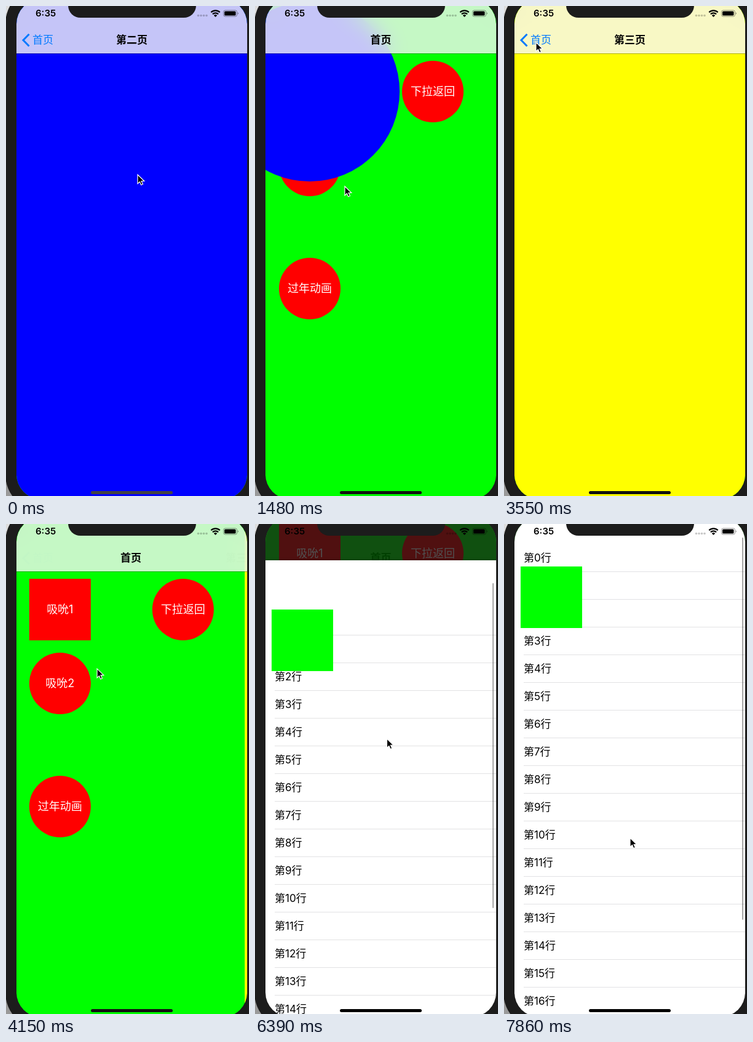
An HTML page that plays this animation: 395 by 796 pixels, repeating every 8 s.

```html
<!DOCTYPE html>
<html lang="zh">
<head>
<meta charset="utf-8">
<style>
html, body { margin: 0; width: 100%; height: 100%; overflow: hidden; }
body { position: relative; background: linear-gradient(#ddd, #999); font: 17px/44px Inter, "Noto Sans CJK SC", "Noto Sans CJK", sans-serif; color: #000; }
div, svg { position: absolute; }
.phone { left: -1px; top: -31px; width: 420px; height: 852px; border-radius: 60px; background: #1c1c1c; }
.screen { left: 17px; top: -11px; width: 375px; height: 812px; border-radius: 40px; overflow: hidden; }
.full { left: 0; top: 0; width: 375px; height: 812px; }
#home { background: #0f0; }
.btn { width: 100px; height: 100px; border-radius: 50%; background: #f00; color: #fff; font-size: 18px; line-height: 100px; text-align: center; white-space: nowrap; }
#nav { left: 0; top: 0; width: 375px; height: 89px; }
#bar { left: 0; top: 0; width: 375px; height: 88px; background: rgba(247,247,247,.8); backdrop-filter: blur(18px); }
#line { left: 0; top: 88px; width: 375px; height: 1px; background: rgba(0,0,0,.3); }
.title { left: 0; top: 44px; width: 375px; text-align: center; font-weight: 600; }
#back { left: 26px; top: 44px; width: 80px; color: #007aff; }
#back svg { left: -18px; top: 11px; }
#sheet { background: #fff; }
.row { left: 15px; width: 360px; height: 44px; border-bottom: 1px solid #e2e2e4; }
.box { left: 10px; top: 80px; width: 100px; height: 100px; background: #0f0; }
#thumb { border-radius: 2px; background: rgba(0,0,0,.35); }
.notch { left: 84px; top: 0; width: 208px; height: 30px; border-radius: 0 0 20px 20px; background: #1c1c1c; }
.clock { left: 31px; top: 1px; font-size: 15px; font-weight: 600; }
#pill { left: 121px; top: 799px; width: 133px; height: 5px; border-radius: 3px; }
#cursor { left: -1px; top: -1px; overflow: visible; }
</style>
</head>
<body>
<div class="phone"></div>
<div class="screen">
  <div id="home" class="full"></div>
  <div id="page" class="full"></div>
  <div id="veil" class="full"></div>
  <div id="nav">
    <div id="bar"></div><div id="line"></div>
    <div id="homeTitle" class="title">首页</div>
    <div id="pageTitle" class="title"></div>
    <div id="back"><svg width="16" height="24"><path d="M12.5 1.8 3 11.5l9.5 9.7" fill="none" stroke="#007aff" stroke-width="3"/></svg>首页</div>
  </div>
  <div id="sheet" class="full"><div id="rows"></div><div class="box"></div><div id="thumb"></div></div>
  <div class="notch"></div>
  <div class="clock">6:35</div>
  <svg width="375" height="40" style="left:0;top:0">
    <g fill="#000" fill-opacity=".22"><circle cx="295.5" cy="26.5" r="1.8"/><circle cx="300" cy="26.5" r="1.8"/><circle cx="304.500" cy="26.5" r="1.8"/><circle cx="309" cy="26.5" r="1.8"/></g>
    <g fill="none" stroke="#000" stroke-width="2.2"><path d="M316.300 21.300a10.200 10.200 0 0 1 14.400 0M318.900 24.200a6.500 6.500 0 0 1 9.200 0"/></g>
    <path d="M323.500 29l-2.700-2.800a3.900 3.900 0 0 1 5.400 0z"/>
    <rect x="336.500" y="18" width="22" height="10" rx="2.8" fill="none" stroke="#000" stroke-opacity=".4"/>
    <rect x="338" y="19.500" width="18.500" height="7" rx="1.500"/>
    <path d="M359.800 21.200v3.600q1.300-.5 1.300-1.800t-1.300-1.800z" fill-opacity=".4"/>
  </svg>
  <div id="pill"></div>
</div>
<svg id="cursor" width="16" height="22"><path d="M1 1v14.700l3.400-3.200 2.300 5.200 2.700-1.200-2.300-5h4.600z" stroke="#fff" stroke-width="1.200"/></svg>
<script>
const $ = id => document.getElementById(id);
const LOOP = 8000, STEP = 148.3, H = 812;

const add = (parent, cls, text, css) => {
  const el = document.createElement('div');
  el.className = cls;
  el.textContent = text;
  el.style.cssText = css;
  parent.append(el);
};
[['吸吮1', 22, 100, 0], ['下拉返回', 222, 100, 50], ['吸吮2', 22, 220, 50], ['过年动画', 22, 420, 50]]
  .forEach(([s, x, y, r]) => add($('home'), 'btn', s, `left:${x}px;top:${y}px;border-radius:${r}px`));
for (let i = 0; i < 18; i++) add($('rows'), 'row', `第${i}行`, `top:${44 + 45 * i}px`);

const clamp = v => Math.min(1, Math.max(0, v));
const smooth = p => p * p * (3 - 2 * p);
const out = p => 1 - (1 - p) ** 3;

// Linear interpolation over keys [time, ...values]
function along(keys, t) {
  let i = keys.findIndex(k => k[0] > t);
  if (i < 0) return keys.at(-1).slice(1);
  if (!i) return keys[0].slice(1);
  const a = keys[i - 1], b = keys[i], p = (t - a[0]) / (b[0] - a[0]);
  return a.slice(1).map((v, j) => v + (b[j + 1] - v) * p);
}

const pointer = [
  [0, 214, 274], [590, 48, 55], [880, 48, 55], [1483, 146, 293], [1927, 98, 278], [2076, 92, 277],
  [2370, 92, 277], [2669, 117, 291], [2960, 117, 285], [3410, 55, 61], [3558, 52, 59], [3760, 52, 59],
  [4152, 148, 235], [4300, 158, 302], [4448, 158, 302], [4890, 303, 137], [5340, 303, 137],
  [5487, 322, 155], [5930, 215, 279], [6140, 215, 279], [6970, 213, 524], [7200, 212, 555],
  [7320, 212, 555], [7860, 205, 510]
];
const pull = [[6140, 0], [6970, 245], [7200, 276], [7320, 276], [7450, 120], [7600, 35], [7840, 0]];

function draw(t) {
  const ramp = (start, length) => clamp((t - start) / length);
  const move = (id, x, y) => $(id).style.transform = `translate(${x}px,${y}px)`;
  const fade = (id, a) => $(id).style.opacity = a;

  // Circular pop, circular push, then a sideways pop
  const second = t < 2000;
  const slide = out(ramp(3790, 465));
  const shown = t < 1688 || (t > 2345 && slide < 1);
  const radius = second ? 778 - 728 * smooth(ramp(788, 900)) : 50 + 621 * smooth(ramp(2345, 900));
  const page = $('page').style;
  page.display = shown ? '' : 'none';
  page.background = second ? '#00f' : '#ff0';
  page.clipPath = slide ? 'none' : `circle(${radius}px at 72px ${second ? 150 : 270}px)`;
  move('page', 375 * slide, 0);

  const depth = second ? 1 - ramp(788, 450) : ramp(2345, 450) * (1 - slide);
  $('pageTitle').textContent = second ? '第二页' : '第三页';
  fade('pageTitle', depth);
  fade('back', depth);
  fade('homeTitle', 1 - depth);
  move('pageTitle', 180 * slide, 0);
  move('homeTitle', slide ? -144 * (1 - slide) : 0, 0);

  // Sheet rises pushing the home view, then is pulled down
  const rise = out(ramp(5370, 500));
  const pulling = t > 6140;
  const drop = along(pull, t)[0];
  const top = pulling ? drop : H * (1 - rise);
  const p = drop / H;
  const parallax = slide > 0 && slide < 1 ? -112 * (1 - slide) : 0;
  move('home', parallax, pulling ? -100 * (1 - p) : -H * rise);
  move('nav', 0, pulling ? 0 : -H * rise);
  fade('nav', pulling ? p : 1);
  $('veil').style.background = pulling ? `rgba(0,0,0,${0.8 * (1 - p)})` : `rgba(255,255,255,${rise ? 0.133 : 0})`;
  move('sheet', 0, top);
  $('sheet').style.boxShadow = drop ? '0 0 4px rgba(0,0,0,.5)' : 'none';
  move('rows', 0, drop * 116 / 245);

  const q = drop / 245;
  $('thumb').style.cssText = `display:${pulling ? 'block' : 'none'};left:${369.5 - 3.5 * q}px;top:${33 + 14 * q}px;width:2.5px;height:${621 - 325 * q}px`;
  $('pill').style.background = t < 788 ? '#444' : pulling || rise ? '#000' : '#111';

  move('cursor', ...along(pointer, t));
}

function tick(now) {
  const t = now % LOOP;
  draw(Math.min(53, Math.floor((t + 10) / STEP)) * STEP);
  requestAnimationFrame(tick);
}
tick(performance.now());
</script>
</body>
</html>
```
